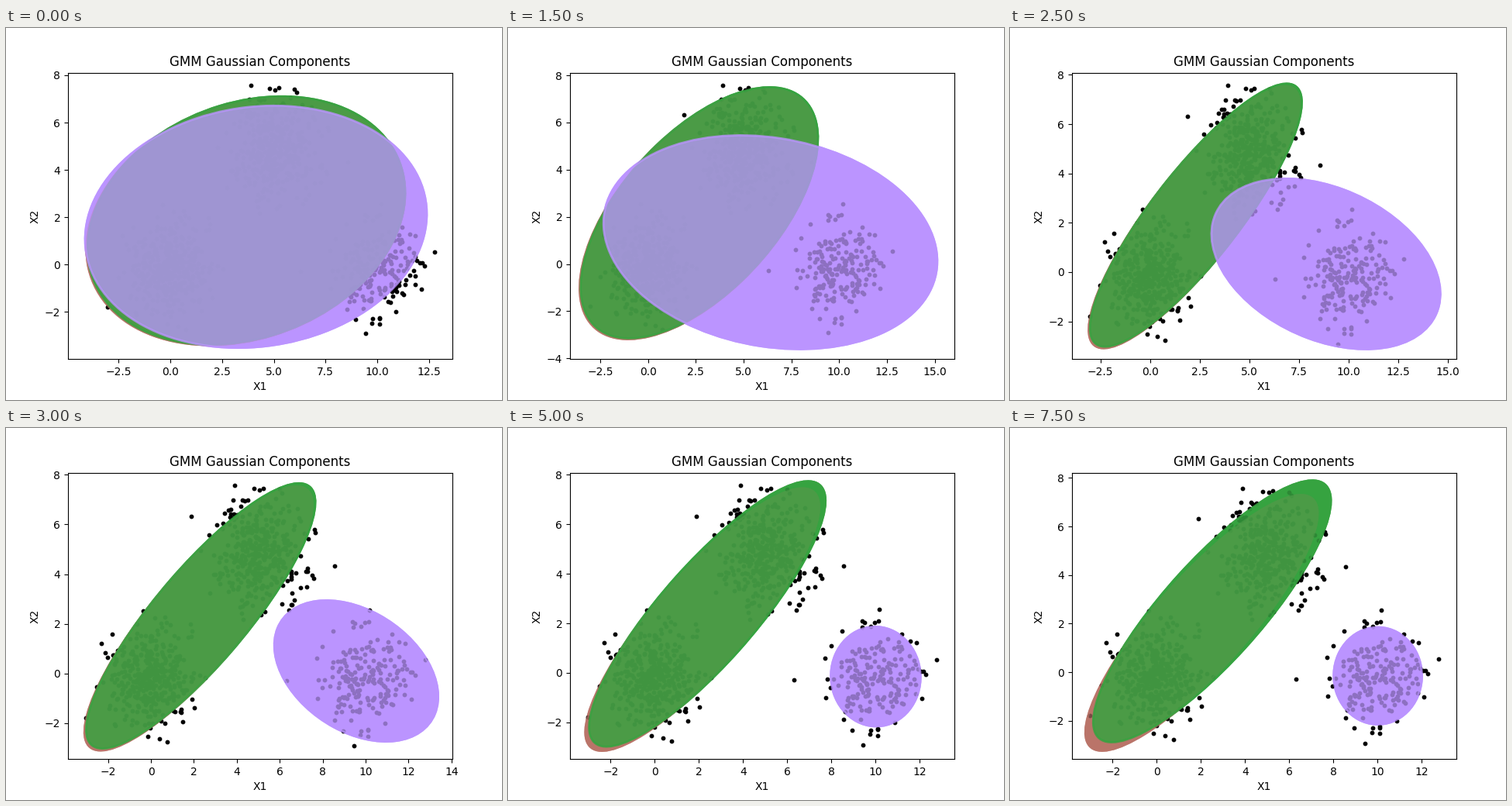
A matplotlib script that plays this animation: 640x480 px, repeating every 8000 ms.

```python
import numpy as np
import matplotlib.pyplot as plt
from matplotlib.animation import FuncAnimation
from matplotlib.patches import Ellipse

FRAMES, STEP_MS = 16, 500
BROWN, GREEN, PURPLE = "#ba7469", "#36a340", "#bb94ff"

# Cluster centres and sizes; every cluster has unit variance
CENTRES = np.array([(0, 0), (4.95, 4.95), (10.02, -.15)])
SIZES = [400, 400, 200]

# Lone points that set the reach of the data
STRAYS = np.array([(-3.05, -1.79), (3.9, 7.56), (1.88, 6.33), (8.56, 4.33),
                   (6.3, -.29), (9.44, -2.92), (12.79, .54)])


def make_points(rng):
    groups = [rng.normal(c, 1, (n, 2)) for c, n in zip(CENTRES, SIZES)]
    groups = [g[np.hypot(*(g - c).T) < 2.9] for g, c in zip(groups, CENTRES)]
    pts = np.vstack(groups)
    lo, hi = STRAYS.min(axis=0), STRAYS.max(axis=0)
    inside = ((pts > lo) & (pts < hi)).all(axis=1)
    return np.vstack([pts[inside], STRAYS])


def moments(weights, centres=CENTRES, spread=1.0):
    """Mean and covariance of a component that owns a share of each cluster."""
    mean = weights @ centres
    d = centres - mean
    return mean, spread * np.eye(2) + (weights[:, None] * d).T @ d


def diagonal_pair(i):
    """Brown and green let go of the right cluster, then drift apart."""
    right = 0.178 * max(0, 1 - (i / 4) ** 1.15)
    top = 0.458 - 0.45 * right
    drift = 0.003 + 0.0002 * i * i
    for side, growth in ((-1, 0), (1, 0.0006)):
        w = top + side * drift
        yield moments(np.array([1 - w - right, w, right]),
                      spread=1 + growth * i * i)


def right_component(i):
    """Purple gives up its borrowed points and settles on the right cluster."""
    borrowed = 1 / (1 + np.exp(-1.1 + 0.25 * i + 0.056 * i * i))
    late = np.clip((i - 4) / 2, 0, 1)
    top = 0.44 + 0.26 * late
    # Only the nearest borrowed points remain late on
    centres = CENTRES + 0.15 * late * (CENTRES[2] - CENTRES)
    weights = np.array([borrowed * (1 - top), borrowed * top, 1 - borrowed])
    return moments(weights, centres)


points = make_points(np.random.default_rng(7))

fig, ax = plt.subplots(figsize=(6.4, 4.8), dpi=100)
ax.set_title("GMM Gaussian Components")
ax.set_xlabel("X1")
ax.set_ylabel("X2")
ax.scatter(*points.T, s=10, color="black", zorder=2)


def add_ellipse(color, alpha, z):
    return ax.add_patch(Ellipse((0, 0), 1, 1, fc=color, ec=color, lw=2,
                                alpha=alpha, zorder=z))


# Solid layer under the points, translucent layer above them
layers = [(add_ellipse(c, 1, 1.3 - k / 10), add_ellipse(c, a, 2.1 + k / 10))
          for k, (c, a) in enumerate([(BROWN, .65), (GREEN, .84),
                                      (PURPLE, .76)])]
ANGLES = np.arange(8) * np.pi / 4
RING = np.array([np.cos(ANGLES), np.sin(ANGLES)])


def update(i):
    reach = [points]
    for pair, (mean, cov) in zip(layers,
                                 [*diagonal_pair(i), right_component(i)]):
        lam, vec = np.linalg.eigh(cov)
        semi = 2 * np.sqrt(lam)
        for e in pair:
            e.set_center(mean)
            e.set_width(2 * semi[0])
            e.set_height(2 * semi[1])
            e.set_angle(np.degrees(np.arctan2(vec[1, 0], vec[0, 0])))
        reach.append(mean + (vec @ (semi[:, None] * RING)).T)
    reach = np.vstack(reach)
    lo, hi = reach.min(axis=0), reach.max(axis=0)
    pad = 0.05 * (hi - lo)
    ax.set_xlim(lo[0] - pad[0], hi[0] + pad[0])
    ax.set_ylim(lo[1] - pad[1], hi[1] + pad[1])
    return [e for pair in layers for e in pair]


anim = FuncAnimation(fig, update, frames=FRAMES, interval=STEP_MS,
                     repeat=True, repeat_delay=0, blit=False)
plt.show()
```
